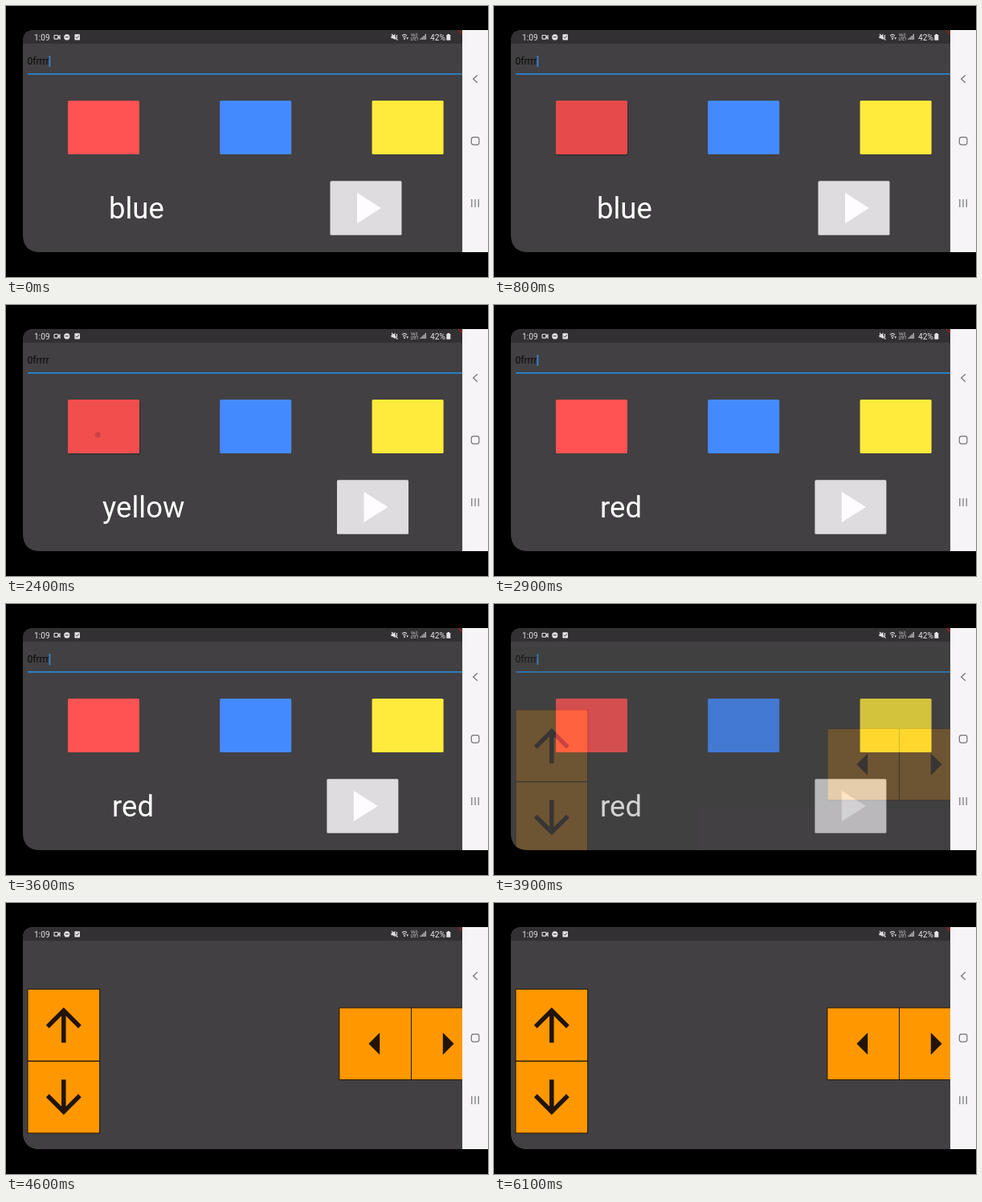
Animation of 600x338 px, one loop 9.7 s. Source, as an HTML page:

```html
<!DOCTYPE html>
<html lang="en">
<head>
<meta charset="utf-8">
<title>Colour words</title>
<style>
html, body { margin: 0; height: 100%; overflow: hidden; background: #000; }
svg { display: block; width: 100vw; height: 100vh; font-family: Roboto, sans-serif; }
</style>
</head>
<body>
<svg viewBox="0 0 600 338">
  <defs>
    <clipPath id="screen"><path d="M568 30H35Q21 30 21 44V285Q21 307 43 307H568Z"/></clipPath>
    <clipPath id="face"><rect id="faceRect" y="118" width="89" height="67" rx="1.5"/></clipPath>
  </defs>

  <g clip-path="url(#screen)">
    <rect x="21" y="30" width="547" height="277" fill="#424042"/>
    <text x="26.5" y="72.5" font-size="12" fill="#080808">0frrrr</text>
    <rect id="cursor" x="53.6" y="62" width="1.6" height="14" fill="#2f8fe8"/>
    <rect x="27" y="84" width="541" height="1.5" fill="#2492e8"/>

    <rect id="shadow" y="120" width="90" height="67" rx="2" fill="#000"/>
    <g id="buttons"></g>
    <g id="ink" clip-path="url(#face)">
      <rect id="tint" y="118" width="89" height="67"/>
      <circle id="splash"/>
    </g>

    <text id="word" y="265" font-size="36.5" fill="#fff"></text>
    <g id="play">
      <rect y="218.3" width="89" height="67.4" rx="1.5" fill="#dedcdf"/>
      <path d="M33.5 233V271L63.5 252Z" fill="#fefcff"/>
    </g>

    <g id="pads">
      <rect x="21" y="30" width="547" height="277" fill="#424042"/>
    </g>

    <rect x="21" y="30" width="547" height="17" fill="#323033"/>
    <path d="M562 30H565L568 33V37Z" fill="#7c2422"/>
    <g fill="#e4e2e5" font-size="10.2">
      <text x="35" y="42.5">1:09</text>
      <text x="528" y="42.5">42%</text>
      <g fill="none" stroke="#e4e2e5" stroke-width="1.1">
        <rect x="60" y="36.5" width="4.8" height="4.6" rx=".7"/>
        <path d="M65 38.8L67 37V41Z"/>
        <path d="M493 37.2Q496 34.2 499 37.2M494.2 39.2Q496 37.4 497.8 39.2"/>
        <path d="M480 35L487.5 42.5M486.5 36V40"/>
        <path d="M516.2 42V40.5M518.2 42V38.8M520.2 42V37M522.2 42V35"/>
      </g>
      <circle cx="75.8" cy="38.9" r="3.6"/>
      <path d="M73.8 38.8H77.8" stroke="#323033"/>
      <rect x="85.4" y="35.2" width="6.6" height="7.2" rx=".7"/>
      <path d="M87 38.8L88.4 40.2L90.7 37.3" fill="none" stroke="#323033"/>
      <path d="M479.5 37.3H481.5L484.5 34.8V42.2L481.5 40.2H479.5Z"/>
      <circle cx="496" cy="41" r="1"/>
      <path d="M498.5 39.3H501L499.7 42Z"/>
      <text x="504" y="38.3" font-size="4.6">Vo))</text>
      <text x="503.7" y="42.7" font-size="4.6">LTE1</text>
      <path d="M549.5 35H552V36H553.3V42.7H548.3V36H549.5Z"/>
    </g>
  </g>

  <rect x="568" y="30" width="32" height="277" fill="#f6f4f7"/>
  <g fill="none" stroke="#747275" stroke-width="1.2">
    <path d="M586.8 86.2L581.6 91L586.8 95.8"/>
    <rect x="579.3" y="163.7" width="9.6" height="9.4" rx="2.8"/>
    <path d="M579.8 241V251M584 241V251M588.2 241V251"/>
  </g>
</svg>
<script>
const LOOP = 9700, FRAME = 100;
const $ = id => document.getElementById(id);
const set = (id, attrs) => {
  for (const k in attrs) $(id).setAttribute(k, attrs[k]);
};

const BUTTONS = [[77, '#ff5252'], [266.2, '#448aff'], [455.6, '#ffeb3b']];
$('buttons').innerHTML = BUTTONS.map(([x, fill]) =>
  `<rect x="${x}" y="118" width="89" height="67" rx="1.5" fill="${fill}"/>`).join('');

// Pad: centre and icon path on a 24-unit grid
const ARROW = 'M4 12l1.41 1.41L11 7.83V20h2V7.83l5.58 5.59L20 12l-8-8-8 8z';
const TRIANGLE = 'M14 7l-5 5 5 5z';
const PADS = [[71.8, 152.3, ARROW, 0], [71.8, 242.2, ARROW, 180],
  [459.7, 175.6, TRIANGLE, 0], [549.3, 175.6, TRIANGLE, 180]];
$('pads').innerHTML += PADS.map(([x, y, d, turn]) =>
  `<g transform="translate(${x} ${y})">
    <rect x="-44.8" y="-44.8" width="89.6" height="89.6" fill="#ff9800" stroke="#251705"/>
    <path d="${d}" fill="#21140a" transform="rotate(${turn}) scale(2.75) translate(-12 -12)"/>
  </g>`).join('');

// Word: start time, text, text x, play button x
const WORDS = [[0, 'blue', 128, 403.5], [1800, 'yellow', 120, 412], [2500, 'red', 132, 399.4]];

// Press: start time, button, touch point
const PRESSES = [[500, 0, 114.5, 162], [1300, 1, 325, 165], [1700, 2, 500, 160],
  [2300, 0, 114.5, 162], [2900, 1, 318, 162]];

const clamp = v => Math.max(0, Math.min(1, v));

function bezier(x1, y1, x2, y2) {
  const at = (a, b, s) => 3 * a * s * (1 - s) ** 2 + 3 * b * s * s * (1 - s) + s ** 3;
  return x => {
    let lo = 0, hi = 1;
    for (let i = 0; i < 20; i++) {
      const mid = (lo + hi) / 2;
      if (at(x1, x2, mid) < x) lo = mid; else hi = mid;
    }
    return at(y1, y2, hi);
  };
}
const easeIn = bezier(.42, 0, 1, 1);
const fastOutSlowIn = bezier(.4, 0, .2, 1);

function drawPress(t) {
  const press = PRESSES.find(p => t >= p[0] && t < p[0] + 400);
  const show = press ? 'inline' : 'none';
  set('ink', { display: show });
  set('shadow', { display: show });
  if (!press) return;
  const [start, button, cx, cy] = press;
  const age = t - start, x = BUTTONS[button][0];
  const fade = 1 - clamp((age - 200) / 200);
  set('faceRect', { x });
  set('tint', { x, opacity: .05 * clamp(age / 100) * fade });
  set('splash', { cx, cy, r: Math.max(0, 3.5 + .48 * (age - 100)), opacity: .15 * fade });
  set('shadow', { x: x + .5, opacity: .35 * clamp(age / 200) * fade });
}

function draw(t) {
  const [, text, wordX, playX] = WORDS.filter(w => w[0] <= t).pop();
  $('word').textContent = text;
  set('word', { x: wordX });
  set('play', { transform: `translate(${playX} 0)` });
  set('cursor', { opacity: (t + 400) % 1000 < 500 ? 1 : 0 });
  drawPress(t);

  const p = clamp((t - 3775) / 300);
  set('pads', {
    opacity: p ? easeIn(p) : 0,
    transform: `translate(0 ${69 * (1 - fastOutSlowIn(p))})`
  });
}

const begin = performance.now();
function tick() {
  const t = (performance.now() - begin) % LOOP;
  draw(Math.floor(t / FRAME) * FRAME);
  requestAnimationFrame(tick);
}
tick();
</script>
</body>
</html>
```
